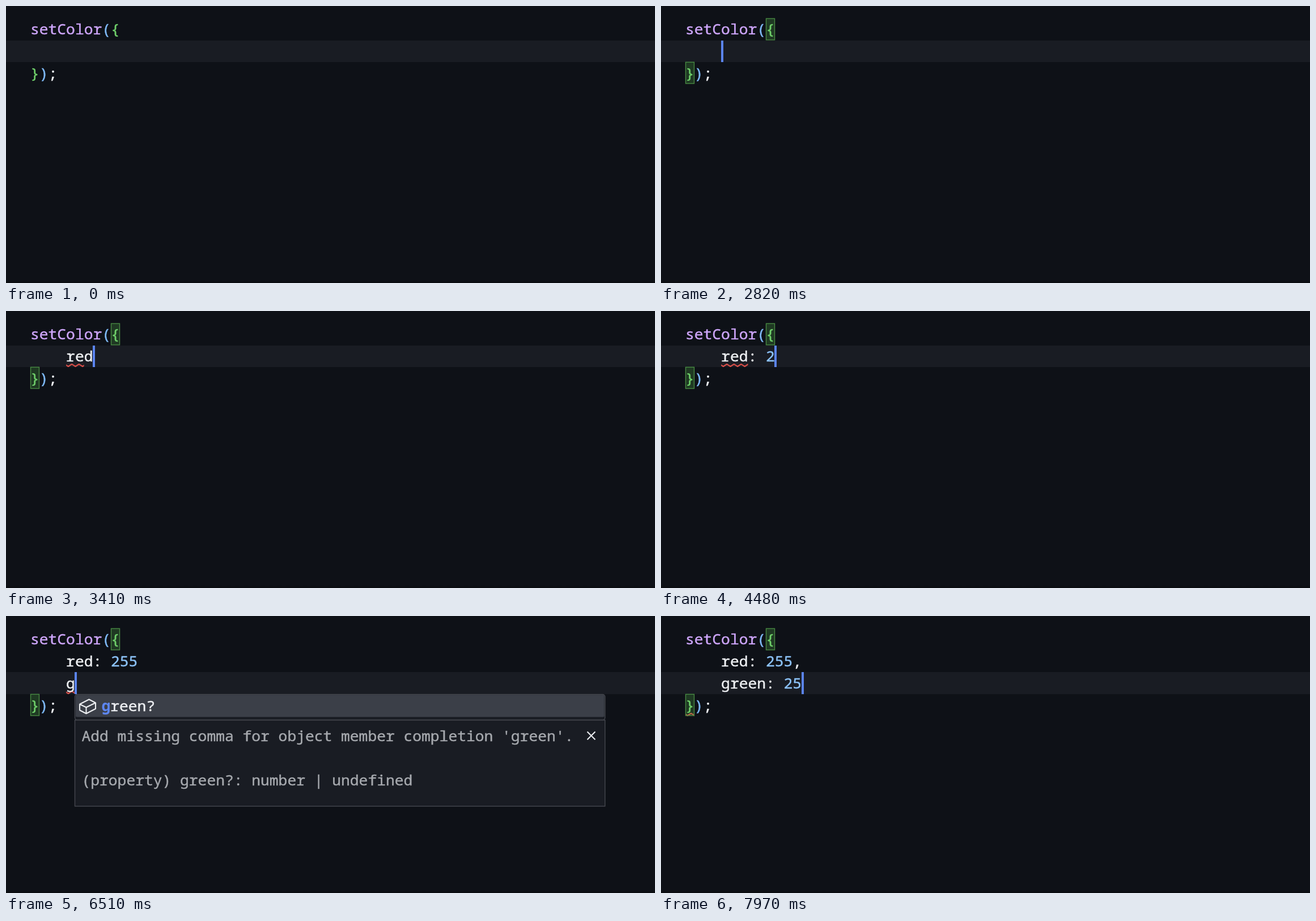
An HTML page that plays this animation: 1145x489 px, repeating every 8000 ms.

```html
<!DOCTYPE html>
<html lang="en">
<head>
<meta charset="utf-8">
<title>Code completion</title>
<style>
  html, body { margin: 0; width: 100%; height: 100%; overflow: hidden; background: #0e1117; }
  svg { display: block; width: 100%; height: 100%; }
  text { font: 26.3px "Noto Sans Mono", "DejaVu Sans Mono", monospace; white-space: pre; color: #eff1f4; }
  text, tspan { fill: currentColor; stroke: currentColor; stroke-width: .45; }
  .func { color: #cea6fb; }
  .paren { color: #7fbaf8; }
  .brace { color: #70d06b; }
  .num { color: #8cc2f7; }
  .hit { color: #5d86f1; font-weight: 700; stroke: none; }
  .dim { color: #a6a9ae; }
  .line { fill: #191c23; }
  .caret { fill: #5b84f0; }
  .match { fill: rgba(90, 200, 80, .22); stroke: #488a43; stroke-width: 1.4; }
  .panel { fill: #191c23; stroke: #45484f; stroke-width: 1.4; }
  .selected { fill: #3b3f48; }
  .icon { fill: none; stroke: #eceef1; stroke-width: 2.1; stroke-linejoin: round; }
  .wave { fill: none; stroke: #e8534c; stroke-width: 1; }
</style>
</head>
<body>
<svg viewBox="0 0 1145 489" preserveAspectRatio="none">
  <defs>
    <pattern id="squiggle" width="6" height="3" patternUnits="userSpaceOnUse" patternTransform="scale(2.1)">
      <path class="wave" d="M-1.2 .5 L1.8 2.5 L4.8 .5 L7.8 2.5"/>
    </pattern>
    <linearGradient id="edge" x2="0" y2="1">
      <stop offset="0" stop-color="#0a0c10" stop-opacity="0"/>
      <stop offset="1" stop-color="#0a0c10"/>
    </linearGradient>
  </defs>
  <g id="editor"></g>
  <rect y="484" width="1145" height="5" fill="url(#edge)"/>
</svg>
<script>
const DURATION = 8000, LEFT = 43, CHAR = 15.78, INDENT = 4;
const editor = document.getElementById('editor');

const RED_HELP = ['(property) red?: number | undefined'];
const GREEN_HELP = ["Add missing comma for object member completion 'green'.",
                    '(property) green?: number | undefined'];
const popup = (word, typed, help) => ({ word, typed, help });

// Each step changes part of the editor state. error: [row, column, length]
const steps = [
  [0,    { lines: [''], row: 1, caret: false, match: false, error: null, popup: null }],
  [820,  { caret: true }],
  [880,  { match: true }],
  [1340, { caret: false }],
  [1830, { caret: true }],
  [2290, { caret: false }],
  [2820, { caret: true }],
  [2880, { lines: ['r'], popup: popup('red?', 1, RED_HELP) }],
  [3070, { lines: ['re'], popup: popup('red?', 2, RED_HELP) }],
  [3410, { lines: ['red'], popup: null, error: [1, 4, 2] }],
  [3880, { error: [1, 4, 3] }],
  [3930, { caret: false }],
  [4020, { lines: ['red:'], caret: true }],
  [4150, { lines: ['red: '] }],
  [4480, { lines: ['red: 2'] }],
  [4540, { error: [2, 0, 1] }],
  [4740, { lines: ['red: 25'] }],
  [4870, { lines: ['red: 255'] }],
  [5210, { lines: ['red: 255', ''], row: 2, error: [3, 0, 1] }],
  [5550, { lines: ['red: 255', 'g'] }],
  [5600, { popup: popup('green?', 1, GREEN_HELP), error: null }],
  [5950, { error: [2, 4, 1] }],
  [6090, { caret: false }],
  [6510, { caret: true }],
  [6840, { lines: ['red: 255,', 'green'], popup: null }],
  [7170, { error: [2, 4, 5] }],
  [7310, { lines: ['red: 255,', 'green:'] }],
  [7440, { lines: ['red: 255,', 'green: '] }],
  [7840, { lines: ['red: 255,', 'green: 2'], error: [3, 0, 1] }],
  [7970, { lines: ['red: 255,', 'green: 25'] }]
];

const colX = col => LEFT + col * CHAR;
const rowY = row => 21.7 + row * 38.85;
const edgeY = row => Math.round(rowY(row));

const span = (kind, s) => `<tspan class="${kind}">${s}</tspan>`;
const text = (x, y, s, kind = '') => `<text class="${kind}" x="${x}" y="${y}">${s}</text>`;
const rect = (kind, x, y, w, h, extra = '') =>
  `<rect class="${kind}" x="${x}" y="${y}" width="${w}" height="${h}" ${extra}/>`;
const codeLine = (row, col, s) => text(colX(col), rowY(row) + 28.4, s);
const bracketBox = (row, col) => rect('match', colX(col) + .5, edgeY(row) + .2, CHAR - .8, 37.6);

function squiggle([row, col, length]) {
  return `<g transform="translate(${colX(col)} ${edgeY(row + 1) - 6.3})">` +
    `<rect width="${length * CHAR}" height="6.3" fill="url(#squiggle)"/></g>`;
}

function popupBox({ word, typed, help }, row) {
  const detailHeight = 80.5 + (help.length - 1) * 71.5;
  const label = span('hit', word.slice(0, typed)) + word.slice(typed);
  const body = rect('panel', .5, .2, 935.3, 45, 'rx="4"') +
    rect('selected', 2, 1, 932.5, 39, 'rx="2"') +
    rect('panel', .5, 45.5, 935.3, detailHeight) +
    '<path class="icon" transform="translate(23 21.5)" d="M-14-4 L2.5-12.5 L14-6.5 V4 L-2.5 12.5 L-14 6.5 Z M-14-4 L-2.5 1.5 L14-6.5 M-2.5 1.5 V12.5"/>' +
    text(47.5, 29.6, label) +
    help.map((s, i) => text(12.5, 83.2 + i * 78, s, 'dim')).join('') +
    '<path class="icon" transform="translate(911.5 73)" d="M-7-7 L7 7 M7-7 L-7 7"/>';
  return `<g transform="translate(${colX(INDENT + typed) - .9} ${rowY(row + 1)})">${body}</g>`;
}

function render({ lines, row, caret, match, error, popup }) {
  const last = lines.length + 1;
  const caretX = Math.floor(colX(INDENT + lines[row - 1].length));
  const top = edgeY(row), height = edgeY(row + 1) - top;
  editor.innerHTML = [
    rect('line', 0, top, 1145, height),
    error ? squiggle(error) : '',
    match ? bracketBox(0, 9) + bracketBox(last, 0) : '',
    codeLine(0, 0, span('func', 'setColor') + span('paren', '(') + span('brace', '{')),
    ...lines.map((s, i) => codeLine(i + 1, INDENT, s.replace(/\d+/, n => span('num', n)))),
    codeLine(last, 0, span('brace', '}') + span('paren', ')') + ';'),
    popup ? popupBox(popup, row) : '',
    caret ? rect('caret', caretX, top, 4, height) : ''
  ].join('');
}

let shown = -1;
const start = performance.now();

function tick() {
  const time = (performance.now() - start) % DURATION;
  const current = steps.filter(([at]) => at <= time).length;
  if (current !== shown) {
    shown = current;
    render(Object.assign({}, ...steps.slice(0, current).map(step => step[1])));
  }
  requestAnimationFrame(tick);
}
tick();
</script>
</body>
</html>
```
